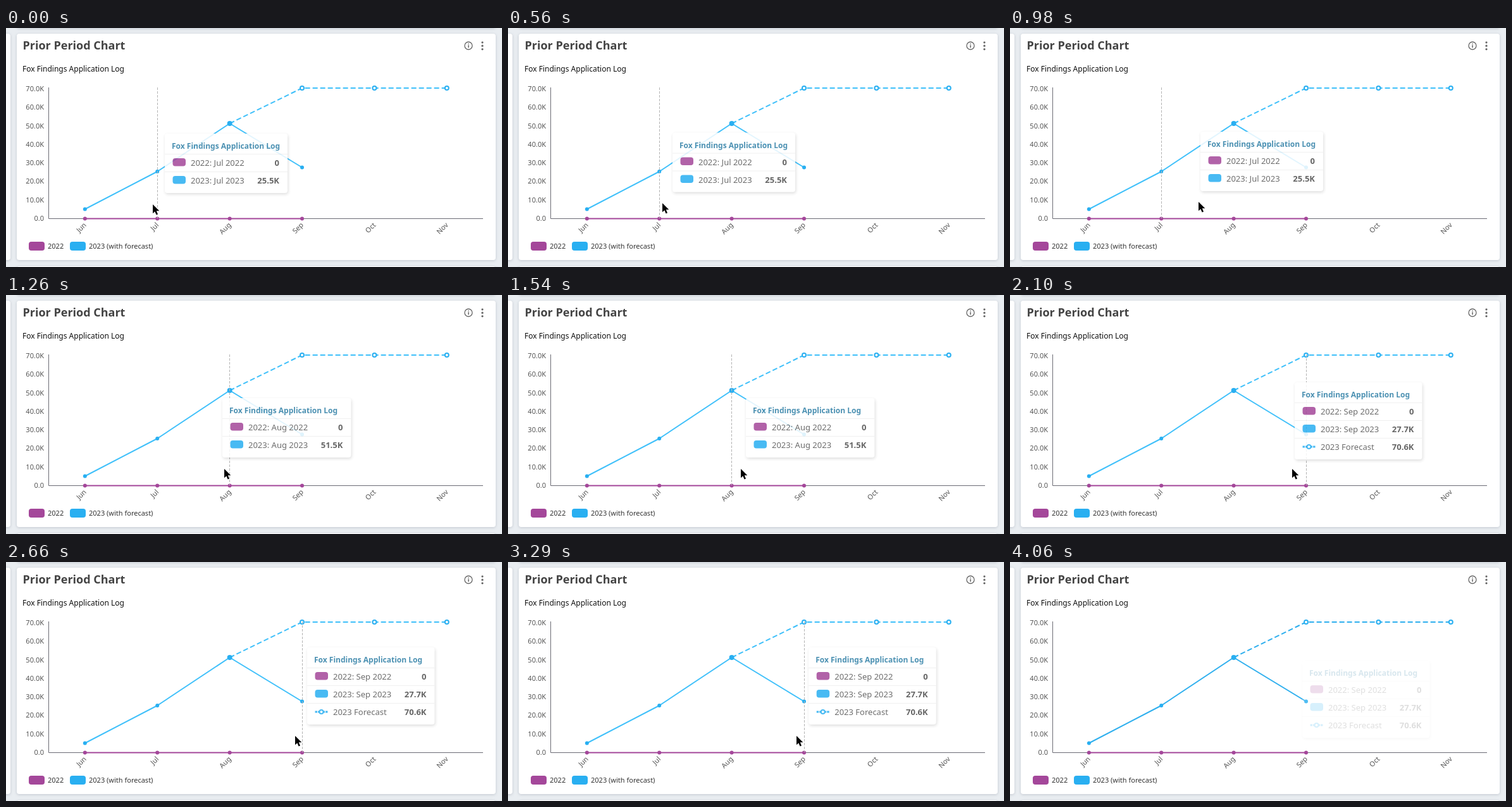
Recreate the animation shown at these times as an HTML page. Size 784x378 px, loop 4.13 s.

```html
<!DOCTYPE html>
<html lang="en">
<head>
<meta charset="utf-8">
<title>Prior Period Chart</title>
<style>
html, body { margin: 0; width: 100%; height: 100%; overflow: hidden; background: #e9edf1; }
svg { display: block; width: 784px; height: 378px; font-family: "Noto Sans", "Open Sans", sans-serif; }
.card { fill: #fff; filter: drop-shadow(0 1px 2px rgba(60, 70, 90, .22)); }
.axis { font-size: 11px; fill: #555; }
.end { text-anchor: end; }
#tip { filter: drop-shadow(1px 2px 2.5px rgba(0, 0, 0, .16)); }
#tip .head { font-size: 12px; font-weight: 600; fill: #2f7fa6; }
#tip .row { font-size: 13px; fill: #555; }
#tip .val { font-size: 13px; font-weight: 600; fill: #4c4c4c; text-anchor: end; }
</style>
</head>
<body>
<svg viewBox="0 0 784 378" xmlns="http://www.w3.org/2000/svg">
  <rect width="784" height="378" fill="#e9edf1"/>
  <rect class="card" x="-20" y="9" width="27" height="358" rx="4"/>
  <rect class="card" x="17" y="-20" width="757" height="20" rx="4"/>
  <rect class="card" x="17" y="377" width="757" height="20" rx="4"/>
  <rect class="card" x="17" y="9" width="757" height="358" rx="4"/>
  <text x="26.5" y="34" font-size="18" font-weight="700" fill="#444">Prior Period Chart</text>
  <text x="26" y="69" font-size="12" fill="#111">Fox Findings Application Log</text>
  <g fill="#666">
    <circle cx="731" cy="28" r="6" fill="none" stroke="#666" stroke-width="1.3"/>
    <path d="M730.3 27h1.5v4.3h-1.5zM730.3 24.4h1.5v1.5h-1.5z"/>
    <circle cx="753" cy="22.8" r="1.6"/><circle cx="753" cy="28.2" r="1.6"/><circle cx="753" cy="33.6" r="1.6"/>
  </g>
  <g id="labels" class="axis"></g>
  <path d="M67.5 94V301.5H754" fill="none" stroke="#6b6b74"/>
  <g id="series"></g>
  <line id="pointer" y1="94" y2="301" stroke="#b5b5b5" stroke-dasharray="4 2"/>
  <rect x="36" y="338" width="25" height="14" rx="4" fill="#a4479a"/>
  <rect x="101" y="338" width="25" height="14" rx="4" fill="#29aff1"/>
  <g class="axis" style="fill:#333">
    <text x="66" y="349">2022</text>
    <text x="131" y="349">2023 (with forecast)</text>
  </g>
  <g id="tip"></g>
  <path id="cursor" d="M0 0V14.2L3.3 11.2 5.6 16.4 8 15.4 5.8 10.3H10.3Z" fill="#000" stroke="#fff" stroke-width="1.2" paint-order="stroke" stroke-linejoin="round"/>
</svg>
<script>
const $ = id => document.getElementById(id);
const LOOP = 4130, STEP = 70, PURPLE = '#a4479a', BLUE = '#29aff1';
const months = ['Jun', 'Jul', 'Aug', 'Sep', 'Oct', 'Nov'];
const px = i => 124.8 + 114.4 * i;
const actual = [286.5, 227, 151, 220.5];
const forecast = 95;

// Tooltip content per hovered month: box width and values
const info = {
  1: { w: 194, now: '25.5K' },
  2: { w: 203.4, now: '51.5K' },
  3: { w: 201.5, now: '27.7K', next: '70.6K' }
};

// Each key: time, x, y
const cursorKeys = [
  [140, 232, 279], [420, 236, 278], [700, 252, 276], [980, 298, 275], [1260, 345, 275],
  [1540, 368, 275], [1820, 396, 275], [2100, 446, 275], [2310, 457, 275], [2870, 457, 275],
  [2940, 456, 275], [3780, 456, 275], [3850, 453, 285], [3920, 448, 312], [3990, 442, 350]
];
const tipKeys = [
  [140, 251, 167], [420, 254, 166], [700, 266, 165], [980, 301, 164], [1260, 342, 163],
  [1540, 376, 163], [1890, 418, 163], [1960, 428, 156], [2100, 450, 138], [2240, 462, 135.5],
  [2380, 471, 135], [2520, 476, 135], [2870, 476, 135], [3010, 475.2, 135], [3780, 475.2, 135],
  [3850, 474.5, 136], [3920, 472, 141], [3990, 467, 149], [4060, 462, 156]
];

function at(keys, t) {
  if (t <= keys[0][0]) return keys[0].slice(1);
  for (let i = 1; i < keys.length; i++) {
    const a = keys[i - 1], b = keys[i];
    if (t <= b[0]) {
      const k = (t - a[0]) / (b[0] - a[0]);
      return [a[1] + (b[1] - a[1]) * k, a[2] + (b[2] - a[2]) * k];
    }
  }
  return keys[keys.length - 1].slice(1);
}

const dot = (x, y, r, fill) => `<circle cx="${x}" cy="${y}" r="${r}" fill="${fill}"/>`;
const ring = (x, y) => `<circle cx="${x}" cy="${y}" r="3" fill="#fff" stroke="${BLUE}" stroke-width="2"/>`;

function drawChart() {
  let s = '';
  for (let i = 0; i < 8; i++)
    s += `<text class="end" x="60" y="${305 - 29.3 * i}">${i ? i * 10 : 0}.0K</text>`.replace('>0.0K', '>0.0');
  months.forEach((m, i) => {
    s += `<text class="end" transform="translate(${px(i)} 309.5) rotate(-45)" y="4">${m}</text>`;
  });
  $('labels').innerHTML = s;

  const pts = actual.map((y, i) => px(i) + ' ' + y);
  s = `<path d="M${px(0)} 301.5H${px(3)}" stroke="${PURPLE}" stroke-width="2"/>`;
  for (let i = 0; i < 4; i++) s += dot(px(i), 301.5, 3, PURPLE);
  s += `<g id="lines" fill="none" stroke-width="2" stroke-linejoin="round">
    <path d="M${pts.join('L')}"/>
    <path d="M${pts[2]}L${px(3)} ${forecast}H${px(5)}" stroke-dasharray="8 4"/></g>`;
  actual.forEach((y, i) => { s += dot(px(i), y, i === 2 ? 4 : 3, BLUE); });
  for (let i = 3; i < 6; i++) s += ring(px(i), forecast);
  $('series').innerHTML = s;
}

function tipMarkup(i) {
  const { w, now, next } = info[i];
  const rows = [
    ['2022: ' + months[i] + ' 2022', '0', PURPLE],
    ['2023: ' + months[i] + ' 2023', now, BLUE]
  ];
  if (next) rows.push(['2023 Forecast', next]);
  let s = `<rect width="${w}" height="${38 + 28 * rows.length}" rx="4" fill="#fff"/>
    <text class="head" x="11" y="24">Fox Findings Application Log</text>`;
  rows.forEach(([label, value, color], r) => {
    const y = 46 + 28 * r;
    s += `<path d="M0 ${y - 13.5}H${w}" stroke="#eee"/>`;
    s += color
      ? `<rect x="12.5" y="${y - 7}" width="20.5" height="12.5" rx="4" fill="${color}"/>`
      : `<path d="M12.5 ${y}h3.5m1 0h2m7 0h2m1 0h3.5" stroke="${BLUE}" stroke-width="3"/>` + ring(22.5, y);
    s += `<text class="row" x="41" y="${y + 5}">${label}</text>
      <text class="val" x="${w - 13}" y="${y + 5}">${value}</text>`;
  });
  return s;
}

let shown = 0;
function draw(t) {
  const i = t < 1050 ? 1 : t < 1960 ? 2 : 3;
  const left = t >= 3990;
  if (i !== shown) {
    $('tip').innerHTML = tipMarkup(i);
    shown = i;
  }
  const [tx, ty] = at(tipKeys, t), [cx, cy] = at(cursorKeys, t);
  $('tip').setAttribute('transform', `translate(${tx} ${ty})`);
  $('tip').setAttribute('opacity', t >= 4060 ? .18 : left ? .6 : .85);
  $('cursor').setAttribute('transform', `translate(${cx} ${cy})`);
  $('cursor').setAttribute('visibility', t >= 4060 ? 'hidden' : 'visible');
  const x = Math.floor(px(i)) + .5;
  $('pointer').setAttribute('x1', x);
  $('pointer').setAttribute('x2', x);
  $('pointer').setAttribute('visibility', left ? 'hidden' : 'visible');
  $('lines').setAttribute('stroke', left ? '#2eafee' : '#3fc0fa');
}

drawChart();
draw(0);
const start = performance.now();
function tick() {
  const t = (performance.now() - start) % LOOP;
  draw(Math.floor(t / STEP) * STEP);
  requestAnimationFrame(tick);
}
requestAnimationFrame(tick);
</script>
</body>
</html>
```
